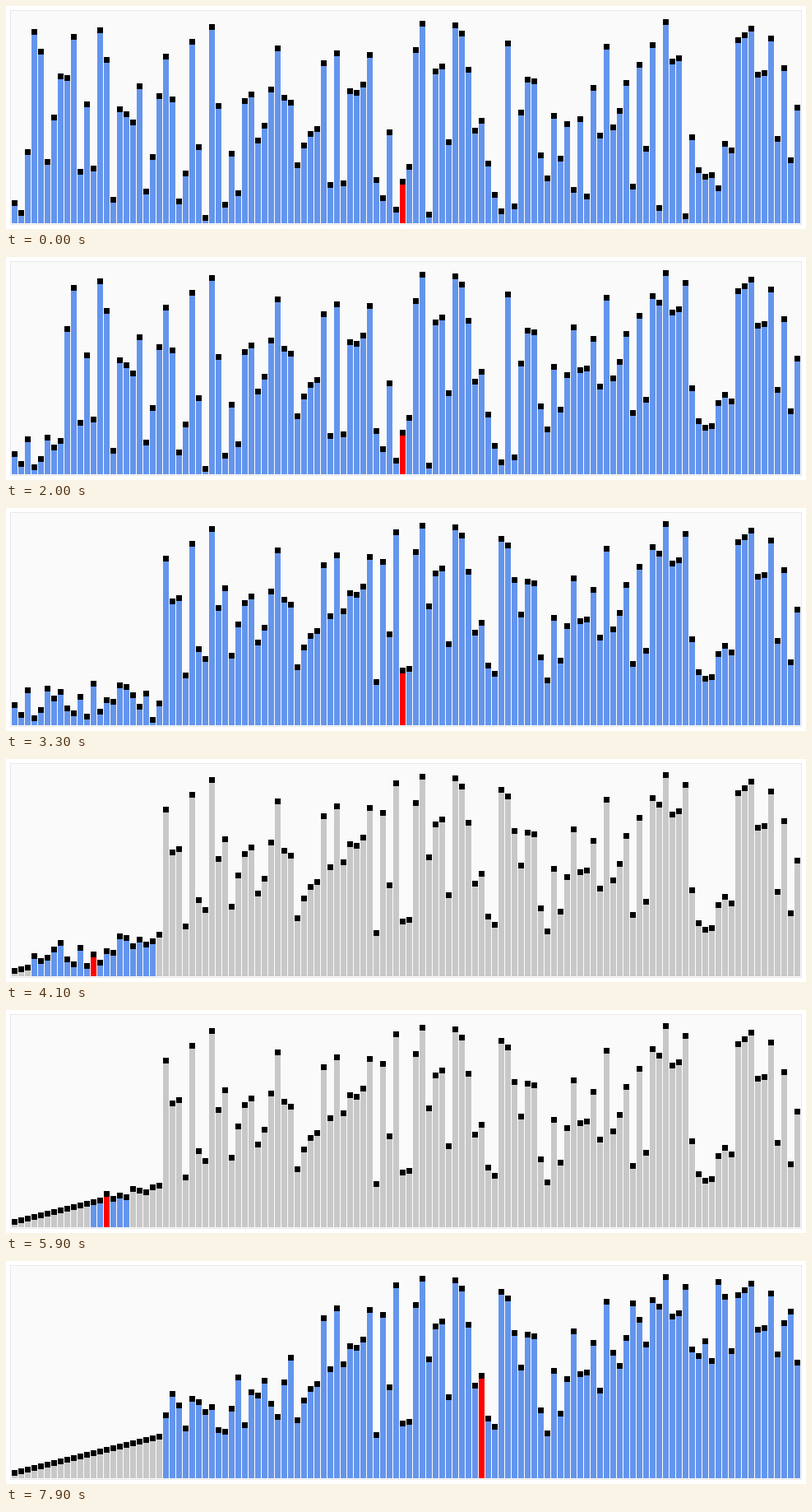
A matplotlib script that plays this animation: 973 px wide and 271 px high, repeating every 8 s.

```python
from itertools import islice

import matplotlib.pyplot as plt
from matplotlib.animation import FuncAnimation
from matplotlib.patches import Rectangle

W, H, DPI = 973, 271, 64
FRAME_MS, FRAMES, HOLD = 100, 80, 15
LEFT, PITCH, BAR, FLOOR = 7, 8, 7, 264

PAGE, PANEL, BORDER = "#ffffff", "#fafafa", "#e8e8e8"
ACTIVE, PIVOT, IDLE, CAP = "#6495ed", "#ff0000", "#c8c8c8", "#000000"

VALUES = [
    10, 4, 41, 114, 102, 35, 62, 87, 86, 111, 29, 70, 31, 115, 97, 12, 67, 64, 59, 81,
    17, 38, 75, 99, 73, 11, 28, 108, 44, 1, 117, 69, 9, 40, 16, 72, 76, 48, 57, 79,
    104, 74, 71, 33, 45, 52, 55, 95, 21, 101, 22, 78, 77, 82, 100, 24, 13, 53, 6, 23,
    32, 103, 119, 3, 90, 93, 47, 118, 113, 91, 54, 60, 34, 15, 5, 107, 8, 65, 85, 84,
    39, 25, 63, 37, 58, 18, 61, 14, 80, 51, 105, 56, 66, 83, 20, 94, 43, 106, 7, 120,
    96, 98, 2, 50, 30, 26, 27, 19, 46, 42, 109, 112, 116, 88, 89, 110, 49, 92, 36, 68,
]


def quicksort(a, lo, hi):
    """Sort in place, yielding (values, lo, hi) after every swap."""
    pivot = a[(lo + hi) // 2]
    i, j = lo, hi
    while i <= j:
        while a[i] < pivot:
            i += 1
        while a[j] > pivot:
            j -= 1
        if i <= j:
            a[i], a[j] = a[j], a[i]
            yield a[:], lo, hi
            i += 1
            j -= 1
    if lo < i - 1:
        yield from quicksort(a, lo, i - 1)
    if i < hi:
        yield from quicksort(a, i, hi)


last = len(VALUES) - 1
states = [(VALUES, 0, last)] * HOLD
states += islice(quicksort(VALUES[:], 0, last), FRAMES - HOLD)

fig = plt.figure(figsize=(W / DPI, H / DPI), dpi=DPI, facecolor=PAGE)
ax = fig.add_axes([0, 0, 1, 1])
ax.set(xlim=(0, W), ylim=(H, 0))
ax.axis("off")


def rect(x, y, w, h, color):
    return ax.add_patch(Rectangle((x, y), w, h, fc=color, lw=0, antialiased=False))


rect(5, 5, W - 10, H - 10, BORDER)
rect(6, 6, W - 12, H - 12, PANEL)
columns = range(LEFT, LEFT + PITCH * len(VALUES), PITCH)
bars = [rect(x, FLOOR, BAR, 0, ACTIVE) for x in columns]
caps = [rect(x, FLOOR, BAR, BAR, CAP) for x in columns]


def draw(frame):
    values, lo, hi = states[frame]
    middle = (lo + hi) // 2
    for k, (value, bar, cap) in enumerate(zip(values, bars, caps)):
        height = 2 * value + 1
        bar.set_y(FLOOR - height)
        bar.set_height(height)
        cap.set_y(FLOOR - height - BAR)
        bar.set_facecolor(PIVOT if k == middle else ACTIVE if lo <= k <= hi else IDLE)
    return bars + caps


anim = FuncAnimation(fig, draw, frames=FRAMES, interval=FRAME_MS, repeat=True, repeat_delay=0)
plt.show()
```
